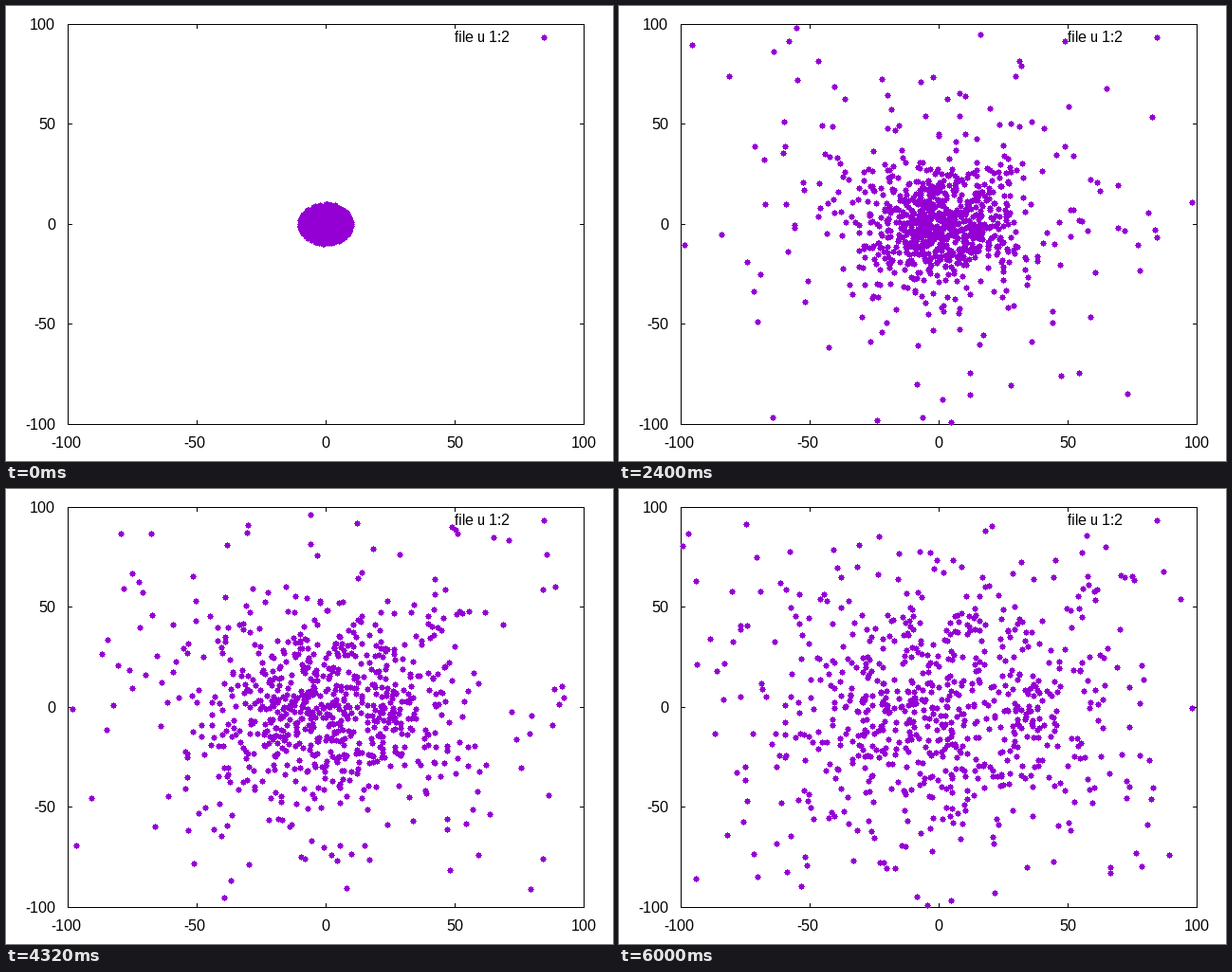
A matplotlib script that plays this animation: 640x480 px, repeating every 6.06 s.

```python
import numpy as np
import matplotlib.pyplot as plt
from matplotlib.animation import FuncAnimation
from matplotlib.collections import PolyCollection
from matplotlib.patches import Rectangle

plt.rcParams["text.hinting"] = "default"
plt.rcParams["text.hinting_factor"] = 1

W, H, DPI = 640, 480, 80
LEFT, RIGHT, TOP, BOTTOM = 65, 609, 19, 441
FRAMES, STEP_MS = 101, 60
COUNT, DISK, CORE_SPEED, CORE_SHARE = 950, 10, 0.36, 0.35
VIOLET = "#9400d3"

fig = plt.figure(figsize=(W / DPI, H / DPI), dpi=DPI, facecolor="white")
ax = fig.add_axes([0, 0, 1, 1])
ax.set_xlim(0, W)
ax.set_ylim(H, 0)
ax.axis("off")


def to_px(x, y):
    px = LEFT + (x + 100) * (RIGHT - LEFT) / 200
    py = BOTTOM - (y + 100) * (BOTTOM - TOP) / 200
    return np.floor(px + 0.5), np.ceil(py - 0.5)


def bar(x, y, w, h):
    ax.add_patch(Rectangle((x, y), w, h, fc="black", lw=0, antialiased=False, zorder=1))


def label(x, y, text, align):
    ax.text(x, y, text, ha=align, va="baseline", family="Liberation Sans",
            size=16 * 72 / DPI, color="black", zorder=2)


def draw_plot_box():
    for y in (TOP, BOTTOM):
        bar(LEFT, y, RIGHT - LEFT + 1, 1)
    for x in (LEFT, RIGHT):
        bar(x, TOP, 1, BOTTOM - TOP + 1)
    for v in range(-100, 101, 50):
        x, y = to_px(v, v)
        bar(x, TOP, 1, 5)
        bar(x, BOTTOM - 4, 1, 5)
        bar(LEFT, y, 5, 1)
        bar(RIGHT - 4, y, 5, 1)
        label(x - 2 if v < 0 else x, 466, str(v), "center")
        label(52, y + 6, str(v), "right")
    label(531, 38, "file u 1:2", "right")


def dots(centers):
    """A square body with a one-pixel spike on each side, per center."""
    corners = np.array([(-1, -1), (1, -1), (1, 1), (-1, 1)])
    boxes = [centers[:, None, :] + 0.5 + corners * size
             for size in ((2.5, 2.5), (3.5, 0.5), (0.5, 3.5))]
    return np.concatenate(boxes)


def make_particles():
    rng = np.random.default_rng(5)
    a, b = rng.uniform(0, 2 * np.pi, (2, COUNT))
    r = DISK * np.sqrt(rng.random(COUNT))
    pos = np.column_stack([r * np.cos(a), r * np.sin(a)])

    # A slow square core plus a tail of fast particles falling off as 1/v
    way = np.column_stack([np.cos(b), np.sin(b)])
    way /= np.abs(way).max(axis=1, keepdims=True)
    u = 1 - rng.random(COUNT)
    in_core = rng.random(COUNT) < CORE_SHARE
    speed = CORE_SPEED * np.where(in_core, u ** 0.6, 1 / u)
    return pos, way * speed[:, None]


def add_dots(centers):
    group = PolyCollection(dots(centers), facecolors=VIOLET, linewidths=0,
                           antialiaseds=False, zorder=3)
    ax.add_collection(group, autolim=False)
    return group


draw_plot_box()
start, velocity = make_particles()
add_dots(np.array([[567, 33]]))
cloud = add_dots(np.column_stack(to_px(*start.T)))


def update(frame):
    p = start + velocity * frame
    p = p[np.abs(p).max(axis=1) <= 100]
    cloud.set_verts(dots(np.column_stack(to_px(*p.T))))
    return (cloud,)


anim = FuncAnimation(fig, update, frames=FRAMES, interval=STEP_MS,
                     init_func=lambda: update(0), repeat=True, repeat_delay=0)
plt.show()
```
